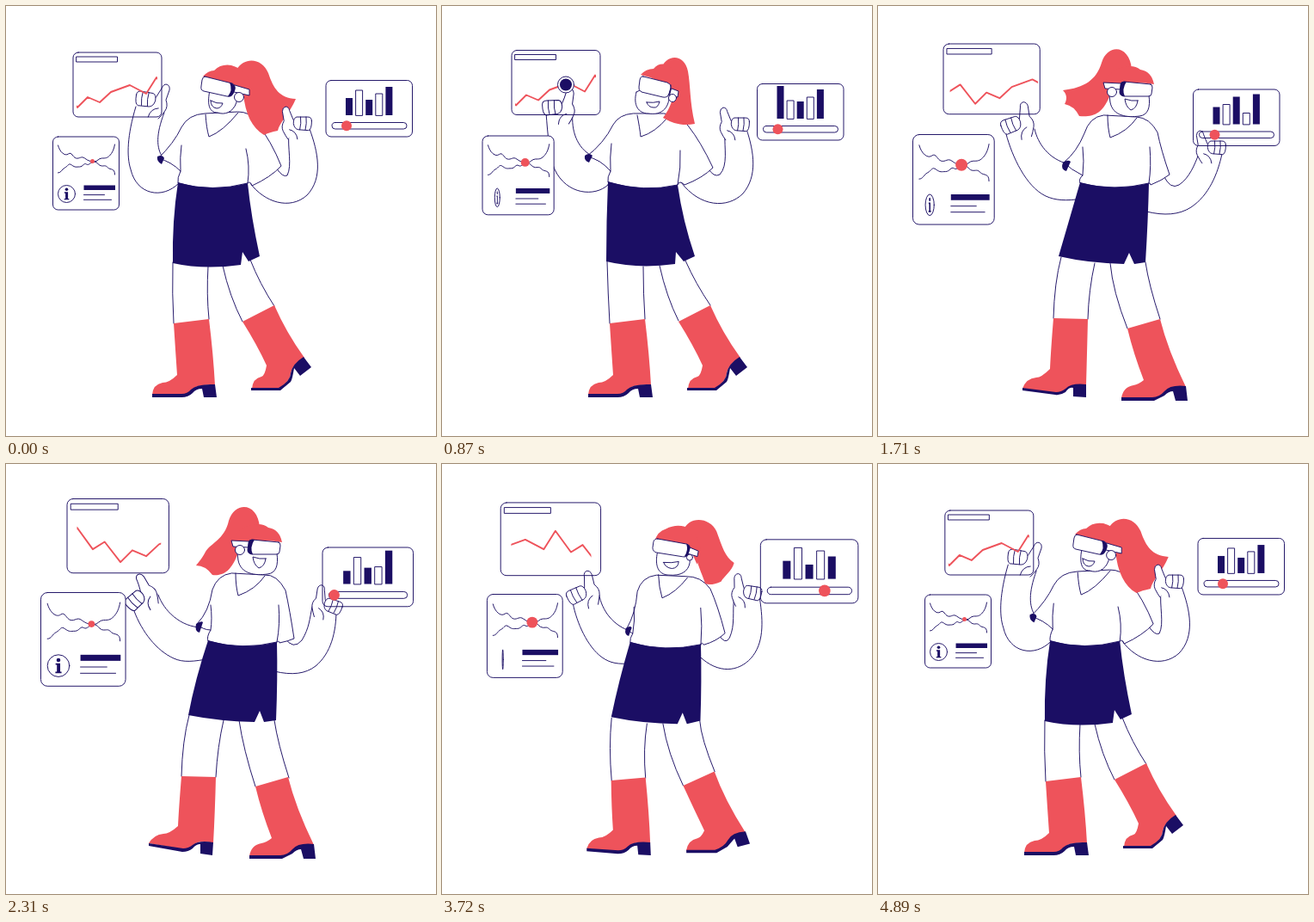
Recreate the animation shown at these times as an HTML page. Size 500 by 500 pixels, loop 4.92 s.

```html
<!DOCTYPE html>
<html lang="en">
<head>
<meta charset="utf-8">
<title>Headset dashboard</title>
<style>
html, body { margin: 0; width: 100%; height: 100%; overflow: hidden; background: #fff; }
svg { display: block; width: 100%; height: 100%; }
svg * { vector-effect: non-scaling-stroke; stroke-linejoin: round; stroke-linecap: round; }
.line { fill: none; stroke: #1b0e64; stroke-width: .95; }
.white { fill: #fff; stroke: #1b0e64; stroke-width: .95; }
.navy { fill: #1b0e64; }
.red { fill: #ee535b; }
.chart { fill: none; stroke: #ee535b; stroke-width: 1.9; }
</style>
</head>
<body>
<svg id="stage" viewBox="0 0 500 500"></svg>
<script>
const LOOP = 4920, STEP = 30;
const TIMES = [0, 870, 1710, 2310, 3150, 4200, LOOP];
const NUMBER = /-?\d+(\.\d+)?/g;
const stage = document.getElementById('stage');
const updates = [];

function add(parent, tag, cls, attrs = {}) {
  const el = document.createElementNS('http://www.w3.org/2000/svg', tag);
  if (cls) el.setAttribute('class', cls);
  for (const key in attrs) el.setAttribute(key, attrs[key]);
  return parent.appendChild(el);
}

// Smooth periodic interpolation without overshoot; equal neighbours hold still.
function curve(values, times) {
  const n = times.length - 1;
  const slope = times.slice(1).map((t, i) => (values[i + 1] - values[i]) / (t - times[i]));
  const tangent = times.map((_, i) => {
    const a = slope[(i + n - 1) % n], b = slope[i % n];
    return a * b > 0 ? 2 * a * b / (a + b) : 0;
  });
  return t => {
    let i = 0;
    while (i < n - 1 && t >= times[i + 1]) i++;
    const span = times[i + 1] - times[i], u = (t - times[i]) / span, v = 1 - u;
    return values[i] * v * v * (1 + 2 * u) + values[i + 1] * u * u * (3 - 2 * u)
      + span * u * v * (v * tangent[i] - u * tangent[i + 1]);
  };
}

// Poses share one text shape; only their numbers move. An empty pose repeats the last one.
function animate(el, attr, poses, times = TIMES) {
  const full = [];
  poses.forEach((p, i) => full.push(p === '' ? full[i - 1] : String(p)));
  while (full.length < times.length) full.push(full[0]);
  const rows = full.map(p => p.match(NUMBER).map(Number));
  const curves = rows[0].map((_, k) => curve(rows.map(r => r[k]), times));
  updates.push(t => {
    let k = 0;
    el.setAttribute(attr, full[0].replace(NUMBER, () => curves[k++](t).toFixed(2)));
  });
  return el;
}

const morph = (cls, poses, parent = stage) => animate(add(parent, 'path', cls), 'd', poses);
const path = (parent, cls, d) => add(parent, 'path', cls, { d });
const rect = (parent, cls, x, y, width, height, rx = 0) =>
  add(parent, 'rect', cls, { x, y, width, height, rx });
const moving = poses => animate(add(stage, 'g'), 'transform', poses);
const placed = poses => moving(poses.map(([x, y, s]) => `translate(${x} ${y}) scale(${s})`));

function linePanel() {
  const g = placed([[78, 54, 1], [81, 51.5, 1], [76, 44, 1.087], [71, 40.5, 1.146], [66.5, 41, 1.165], [71, 49.5, 1.078]]);
  rect(g, 'line', 0, 0, 103, 75, 6);
  rect(g, 'line', 4, 5, 47.5, 6);
  const clip = add(g, 'clipPath', '', { id: 'window' });
  const hole = rect(clip, '', 4, 0, 94, 75);
  animate(hole, 'x', [4, 4, 7, 10, 14, 7]);
  animate(hole, 'width', [94, 94, 94, 85, 78, 88]);
  const frame = add(g, 'g', '', { 'clip-path': 'url(#window)' });
  const wave = [[-39, 29], [-23, 51], [-11, 43.5], [5, 64], [17, 52], [31, 58], [44, 46], [66, 38], [85, 48]];
  const points = [-136, 0, 136].flatMap(shift => wave.map(([x, y]) => [x + shift, y])).join(' ');
  const scroll = add(frame, 'polyline', 'chart', { points });
  animate(scroll, 'transform', [0, 0, 29, 49, 77, 111, 136].map(x => `translate(${x} 0)`));
  const tap = add(g, 'g');
  add(tap, 'circle', 'white', { r: 9.5 });
  add(tap, 'circle', 'navy', { r: 7 });
  animate(tap, 'transform', [0, 0, 1, 0, 0].map(s => `translate(63 40) scale(${s})`), [0, 600, 870, 1140, LOOP]);
}

function barPanel() {
  const g = placed([[372, 86.5, 1], [366.5, 90.5, 1], [366.5, 97, 1], [368, 97, 1.05], [369.5, 92.5, 1.14], [371, 85.5, 1.115]]);
  rect(g, 'line', 0, 0, 100.5, 65.5, 6);
  const heights = [
    [20, 38, 20, 14.5, 16, 20], [29, 21, 23, 29.5, 36, 29], [18, 20, 32, 18, 10.5, 18],
    [25, 25, 13, 19, 29, 28.5], [33, 34, 35, 37, 33, 17]];
  heights.forEach((row, i) =>
    morph(i % 2 ? 'line' : 'navy', row.map(h => `M${23 + i * 11.6} 40.5v${-h}h8v${h}z`), g));
  rect(g, 'line', 7, 49, 87, 7.5, 3.75);
  const knob = add(g, 'circle', 'red', { cy: 52.7, r: 6 });
  animate(knob, 'cx', [24, 24, 25, 13, 41, 78, 29, 24], [...TIMES.slice(0, 6), 4890, LOOP]);
}

function infoPanel() {
  const g = placed([[54.5, 152, 1], [47, 151, 1.08], [40.5, 149.5, 1.23], [40.5, 149.5, 1.285], [47, 150.5, 1.23], [55, 152, 1.065]]);
  rect(g, 'white', 0, 0, 77, 85, 6);
  path(g, 'line', 'M6 10C8 18 14 23 18 20S23 24 27 25S33 22 37 25S44 29 48 29S53 25 57 25S63 25 66 22S71 15 72 9');
  path(g, 'line', 'M6 42C10 42 10 38 14 36S18 30 22 33S27 35 31 35S36 30 39 32S44 29 48 29S53 34 57 34S61 33 64 36S72 36 72 44');
  animate(add(g, 'circle', 'red', { cx: 46, cy: 28.6 }), 'r', [2.5, 4.6, 5.7, 3, 5.7, 5.6]);
  rect(g, 'navy', 36, 56.5, 36.5, 5.5);
  path(g, 'line', 'M36 67.6H60M36 73.3H68');
  const icon = add(g, 'g');
  add(icon, 'circle', 'line', { r: 10 });
  add(icon, 'circle', 'navy', { cy: -5.2, r: 1.8 });
  path(icon, 'navy', 'M-2.6-2.2H1.6V5.4H2.8V6.8H-2.8V5.4H-1.4V-.8H-2.6Z');
  const turn = curve([0, .41, .636, 1, 1.35, 1.63, 2], TIMES);
  updates.push(t => {
    const s = Math.max(.05, Math.abs(Math.cos(turn(t) * Math.PI)));
    icon.setAttribute('transform', `translate(16 66.5) scale(${s.toFixed(3)} 1)`);
  });
}

function hand(poses, sx, sy) {
  const place = moving(poses.map(([x, y, a]) => `translate(${x} ${y}) rotate(${a})`));
  const g = add(place, 'g', '', { transform: `scale(${sx} ${sy})` });
  path(g, 'white', 'M-14 24Q-8 16 -4 4Q-3 -1 1 -1Q5 0 5 5L3 17Q7 24 4 30Q1 36 -2 40');
  path(g, 'white', 'M-32 17Q-32 12 -27 12L-13 12Q-9 13 -9 20Q-10 27 -15 28L-28 29Q-32 28 -32 17Z');
  path(g, 'line', 'M-25 12Q-26 20 -24 28M-18 12Q-19 20 -17 28M-14 40Q-13 30 -4 28');
}

function legs() {
  morph('line', [
    'M194 298Q193 335 195 369M235 303Q233 335 236 364M252 302Q260 338 275 367M284 295Q295 323 312 349',
    'M192 297Q193 335 195 369M234 303Q234 335 236 364M253 302Q261 338 275 366M283 296Q295 323 312 348',
    'M213 292Q205 322 204 363M252 299Q245 330 244 364M270 299Q273 332 290 375M311 298Q315 325 328 364',
    'M213 292Q205 322 204 363M253 298Q246 328 244 364M271 298Q276 332 290 375M312 298Q316 325 329 365', '',
    'M185 298Q185 335 192 372M227 305Q224 335 231 366M246 305Q252 340 273 372M288 299Q290 315 308 351']);
  morph('red', [
    'M195 369L236 364Q241 405 243 441Q222 439 215 447Q210 452 204 452L170 452Q171 440 182 438Q190 438 199 429Q197 400 195 369Z', '',
    'M204 363L244 364Q243 405 242 441Q225 438 218 446Q213 451 207 450L168 445Q172 433 184 432Q190 432 200 422Q201 400 204 363Z',
    'M204 363L244 364Q243 405 241 441Q224 436 217 444Q212 448 206 448L166 441Q172 431 183 430Q190 430 200 421Q201 400 204 363Z', '',
    'M191 372L231 365Q239 405 243 441Q222 439 215 447Q210 452 204 452L170 452Q171 440 182 438Q190 438 198 429Q194 400 191 372Z']);
  morph('navy', [
    'M170 451L204 451Q211 451 215 446Q222 439 243 440L245 455L230 455L228 445Q221 445 217 450Q212 455 204 455L170 455Z', '',
    'M168 444L207 449Q213 449 218 445Q225 438 242 440L242 455L227 454L227 444Q222 443 218 449Q212 453 206 452L168 447Z',
    'M166 441L206 447Q212 447 217 443Q224 437 241 440L240 455L226 453L226 442Q221 442 217 447Q212 451 205 451L166 444Z', '',
    'M170 451L204 451Q211 451 215 446Q222 439 243 440L245 455L230 455L228 445Q221 445 217 450Q212 455 204 455L170 455Z']);
  morph('red', [
    'M275 367L312 348Q326 380 347 409Q333 416 331 427Q331 435 318 445L286 445Q287 433 297 431Q301 430 303 418Q292 394 275 367Z', '',
    'M290 375L328 364Q337 400 358 443Q340 441 333 449Q327 456 320 456L283 456Q285 443 297 441Q303 440 309 435Q297 404 290 375Z', '', '',
    'M273 372L308 351Q322 382 348 414Q334 419 332 429Q330 437 317 445L285 445Q287 433 297 431Q300 430 302 419Q289 396 273 372Z']);
  morph('navy', [
    'M285 444L317 444Q331 436 331 427Q333 416 346 408L355 420L342 430L335 421Q333 434 331 437L319 447L285 447Z', '',
    'M283 455L319 455Q327 455 333 448Q340 440 358 442L360 459L346 459L343 448Q338 448 333 453L321 459L283 459Z', '', '',
    'M285 444L316 444Q330 437 332 428Q334 418 348 413L356 425L342 433L337 424Q334 434 331 438L318 447L285 447Z']);
}

function arms() {
  morph('white', [
    'M151 117C141 150 140 175 145 190C152 220 182 225 201 206L207 188L182 176C175 165 174 150 184 124',
    'M121 124C123 150 125 175 131 190C145 220 178 222 193 208L199 188L174 174C157 165 150 145 152 124',
    'M149 149C156 175 172 210 195 221C206 226 218 227 238 224L240 193L222 184C198 178 186 160 182 143',
    'M149 171C158 195 175 217 195 226C206 231 218 230 238 226L240 188L228 190C203 190 183 170 177 152', '',
    'M155 149C154 170 160 205 172 222C180 232 190 236 207 236L210 205L207 198C194 185 188 172 187 150']);
  morph('white', [
    'M353 143C363 170 369 200 350 220C330 238 300 228 284 206L290 195L314 188Q322 200 327 197C333 185 327 165 329 148',
    'M354 143C363 170 367 198 350 218C332 236 300 234 278 205L285 195L309 188Q316 200 323 196C333 185 328 165 329 149',
    'M400 172C395 195 385 220 364 234C350 243 333 244 312 239L312 200L332 197Q340 214 350 208C362 200 368 185 373 172',
    'M384 170C384 195 378 220 360 235C348 244 333 246 312 241L312 200L324 202Q334 217 344 205C353 190 353 180 356 166',
    'M374 160C377 190 376 214 360 231C348 243 332 245 312 240L312 200L325 202Q334 214 340 202C345 185 342 175 344 160',
    'M365 152C371 180 372 205 358 222C340 240 310 245 287 209L293 200L317 193Q325 208 330 202C338 188 334 170 336 154']);
}

function clothes() {
  morph('white', [
    'M231 125Q212 126 204 141Q195 160 177 177Q192 181 203 192Q199 200 200 206Q240 217 281 206Q284 203 286 209Q308 199 320 186Q309 158 290 133Q283 123 270 123Z',
    'M222 125Q206 126 199 138Q188 160 168 175Q184 178 196 192Q192 199 193 205Q235 217 274 208Q276 202 282 208Q303 200 315 188Q301 158 286 139Q276 126 258 125Z',
    'M262 127Q246 129 240 148Q231 170 216 182Q224 190 238 197Q233 201 235 206Q275 216 315 206Q316 205 317 208Q330 203 339 196Q329 167 325 147Q316 130 301 129Z',
    'M262 127Q246 129 240 146Q236 172 222 186Q229 193 238 193Q233 201 235 206Q275 217 315 207Q318 205 318 208Q328 206 335 203Q330 170 325 147Q315 128 301 129Z', '',
    'M236 131Q218 133 213 150Q211 175 203 196Q207 199 207 200Q204 204 204 209Q245 221 287 212Q288 208 291 212Q311 206 323 190Q312 160 298 142Q288 132 270 132Z']);
  morph('line', [
    'M204 162Q202 176 203 192M279 166Q284 186 281 206M232 126Q233 142 236 152Q252 146 270 124',
    'M197 160Q195 176 196 192M277 168Q278 188 274 208M227 127Q230 142 231 152Q248 147 262 130',
    'M238 164Q240 180 238 197M316 164Q318 186 315 206M267 127Q267 142 270 153Q290 146 301 130',
    'M238 164Q240 180 238 193M317 164Q319 186 315 207M267 127Q267 142 270 153Q290 146 301 130', '',
    'M209 168Q209 184 207 200M285 170Q288 190 287 212M237 130Q238 145 242 158Q256 152 272 134']);
  morph('navy', [
    'M176 175Q182 172 184 177L181 184Q175 181 176 175Z',
    'M166 174Q171 170 175 174L171 182Q165 180 166 174Z',
    'M215 182Q221 178 224 181L219 192Q212 190 215 182Z',
    'M221 186Q227 182 229 184L225 196Q219 195 221 186Z', '',
    'M202 195Q206 192 208 195L205 203Q200 202 202 195Z']);
  morph('navy', [
    'M200 205Q240 217 281 206Q285 245 295 291L282 297L275 286L273 301Q230 307 194 299Q193 250 200 205Z',
    'M193 204Q235 217 274 208Q280 250 294 291L281 297L272 286L271 300Q228 306 191 297Q191 250 193 204Z',
    'M235 205Q275 216 315 206Q314 250 311 298L298 300L292 287L286 300Q245 299 210 291Q222 250 235 205Z',
    'M235 205Q275 217 315 207Q316 250 314 298L300 300L295 287L289 300Q247 299 212 292Q220 250 235 205Z', '',
    'M204 208Q245 221 287 212Q289 255 290 299L273 304L268 291L262 304Q222 305 185 297Q194 252 204 208Z']);
}

function head() {
  morph('red', [
    'M268 74C278 58 298 61 305 78C311 96 318 107 337 108C330 125 318 135 316 145Q306 147 300 150C286 142 278 125 276 102Z',
    'M254 75C260 55 282 55 286 76C289 92 288 112 294 137C285 139 277 138 270 136Q264 134 257 130C266 118 270 105 270 95Z',
    'M295 74C293 45 267 43 260 66C254 86 240 95 215 98C221 104 219 110 217 114Q228 116 234 128C248 129 262 128 271 100Z',
    'M295 74C293 44 266 43 259 66C254 88 238 92 232 102C228 110 224 114 221 118Q232 118 240 129C250 130 262 128 271 100Z',
    'M288 76C290 54 318 52 325 74C329 95 318 112 314 122C312 128 308 132 303 135Q300 128 300 124C306 110 304 100 300 88Z',
    'M274 80C282 62 304 66 312 80C322 98 332 104 349 109C346 122 336 128 332 138Q318 149 308 151C296 140 286 128 286 108Z']);
  const tucked = 'M266 110L266 110L266 110L266 110Z';
  morph('red', [tucked, '', '', '', 'M271 110L257 114L259 123L271 127Z', tucked]);
  morph('white', [
    'M237 98C234 112 235 124 246 124C254 127 264 124 268 112L268 92Q250 88 237 98',
    'M226 100C222 115 228 125 240 125C252 127 262 122 264 108L266 95Q245 88 226 100',
    'M315 104C317 118 314 127 304 128C290 130 273 128 270 112L268 96Q295 90 315 104', '',
    'M270 100C266 118 272 127 284 128C296 128 303 122 304 112L306 95Q290 90 270 100',
    'M241 104C238 118 240 130 251 130C260 132 270 128 273 117L273 97Q254 92 241 104']);
  morph('red', [
    'M229 82Q235 75 242 75Q250 67 262 69Q280 74 284 90L283 99L266 92Q250 86 229 82Z',
    'M231 80Q237 73 246 73Q252 66 260 68Q273 73 275 90L274 98L268 97Q250 84 231 80Z',
    'M321 91Q318 76 305 74Q298 68 285 71Q268 74 264 90L266 98L282 92Q300 87 321 91Z', '',
    'M272 92Q271 78 282 72Q292 68 300 72Q313 80 314 105L306 128L308 95Q290 88 272 92Z',
    'M234 88Q240 78 247 78Q255 71 266 73Q285 78 288 96L287 105L270 98Q252 88 234 88Z']);
  morph('white', [
    'M266 92L283 97L283 104L265 100Z', 'M267 96L275 99L274 106L265 103Z',
    'M282 90L262 89L264 96L282 97Z', '', 'M307 96L308 97L307 104L306 103Z', 'M270 97L288 103L287 109L269 105Z']);
  const ear = add(stage, 'circle', 'white');
  animate(ear, 'cx', [271, 268, 272, 272, 300, 276]);
  animate(ear, 'cy', [106, 107, 100, 100, 104, 111]);
  animate(ear, 'r', [5.5, 4.5, 5.5, 5.5, 1, 5.5]);
  morph('white', [
    'M231 82L263 90Q267 92 266 97L264 102Q262 106 257 105L230 99Q226 98 227 93L228 86Q229 82 231 82Z',
    'M234 82L262 89Q267 91 266 95L264 102Q262 107 257 106L232 100Q228 98 229 94L230 86Q231 81 234 82Z',
    'M317 91L286 88Q282 88 282 92L281 100Q281 104 286 105L314 105Q318 105 318 102L319 95Q319 91 317 91Z', '',
    'M276 87L304 91Q309 92 308 96L306 104Q305 108 300 107L274 103Q270 102 270 98L271 91Q272 87 276 87Z',
    'M237 87L267 94Q271 95 270 100L268 106Q266 109 261 108L236 103Q232 102 232 97L233 90Q234 86 237 87Z']);
  morph('navy', [
    'M260 89Q268 91 266 98L264 102Q262 106 258 105Q264 98 260 89Z',
    'M266 91Q267 92 266 96L264 103Q263 106 262 106Q266 98 266 91Z',
    'M289 88Q281 87 282 93L281 100Q281 105 287 105Q283 97 289 88Z', '',
    'M307 92Q309 93 308 97L306 104Q306 107 304 107Q308 100 307 92Z',
    'M264 93Q272 95 270 101L268 106Q266 109 262 108Q268 101 264 93Z']);
  morph('white', [
    'M238 110Q245 114 252 113Q250 119 245 119Q238 118 238 110Z',
    'M238 112Q246 113 253 111Q251 119 246 118Q240 118 238 112Z',
    'M302 110Q295 111 287 108Q288 117 294 121Q301 119 302 110Z', '',
    'M281 113Q289 114 297 112Q296 121 289 121Q283 120 281 113Z',
    'M243 115Q250 116 256 114Q255 121 250 122Q244 121 243 115Z']);
}

legs();
arms();
clothes();
head();
hand([[186, 92, 10], [148, 97, -2], [168, 113, -18], [153, 130, -40], [152, 130, -40], [182, 118, -4]], 1, 1);
hand([[326, 118, 0], [328, 119, 0], [375, 146, 0], [368, 142, 18], [351, 133, 9], [340, 125, 8]], -.92, .92);
linePanel();
barPanel();
infoPanel();

function draw() {
  const t = Math.floor(performance.now() % LOOP / STEP) * STEP;
  updates.forEach(update => update(t));
  requestAnimationFrame(draw);
}
draw();
</script>
</body>
</html>
```
